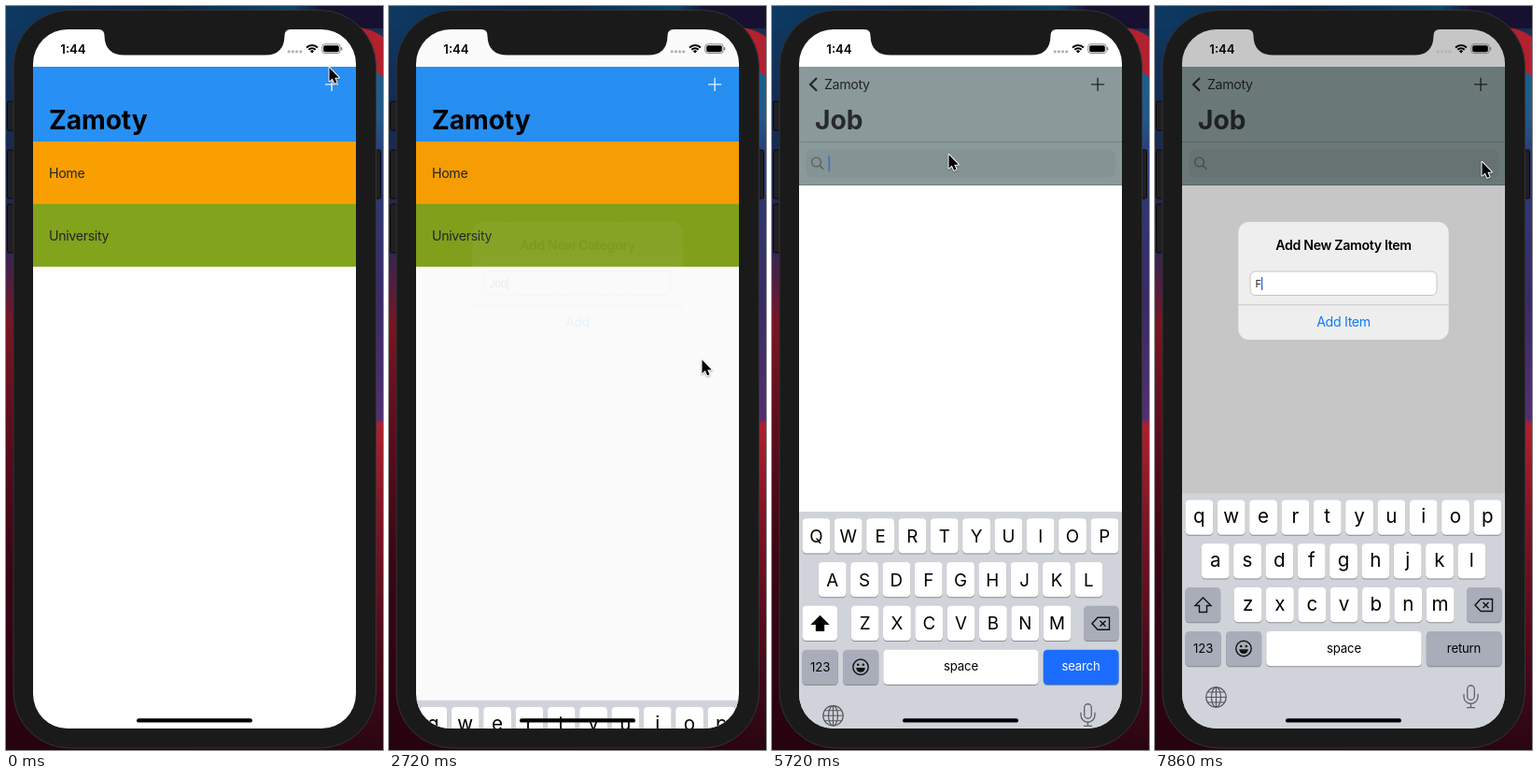
These frames come from a looping animation (404 px wide and 796 px high, 8 s). An HTML page with a canvas:

```html
<!DOCTYPE html>
<html lang="en">
<head>
<meta charset="utf-8">
<title>To-do app demo</title>
<style>
html, body { margin: 0; width: 404px; height: 796px; overflow: hidden; background: #111; }
canvas { display: block; width: 404px; height: 796px; }
</style>
</head>
<body>
<canvas id="stage"></canvas>
<script>
const W = 404, H = 796, LOOP = 8000, FPS = 7, LAST = 55;
const APP = 'Zamoty';
const L = 29, R = 375, TOP = 25, BOTTOM = 773, SCREEN_W = R - L;
const BLUE = '#2890f5', GREY = '#8a9a9a', INK = '#242529';
const canvas = document.getElementById('stage');
const ctx = canvas.getContext('2d');
const dpr = window.devicePixelRatio || 1;
canvas.width = W * dpr;
canvas.height = H * dpr;

// ---- helpers ----
const clamp = v => Math.max(0, Math.min(1, v));
const ramp = (s, start, len) => clamp((s - start) / len);
const easeOut = v => 1 - (1 - v) ** 2;

function rect(x, y, w, h, fill) {
  ctx.fillStyle = fill;
  ctx.fillRect(x, y, w, h);
}

function box(x, y, w, h, r, fill, stroke, line = 1) {
  ctx.beginPath();
  ctx.roundRect(x, y, w, h, r);
  if (fill) { ctx.fillStyle = fill; ctx.fill(); }
  if (stroke) { ctx.strokeStyle = stroke; ctx.lineWidth = line; ctx.stroke(); }
}

function text(str, x, y, size, { color = INK, weight = 400, align = 'left', track = -0.024 } = {}) {
  ctx.font = `${weight} ${size}px Inter, "Liberation Sans", sans-serif`;
  ctx.letterSpacing = size * track + 'px';
  ctx.textAlign = align;
  ctx.fillStyle = color;
  ctx.fillText(str, x, y);
}

function path(points, close) {
  ctx.beginPath();
  points.forEach(([x, y], i) => i ? ctx.lineTo(x, y) : ctx.moveTo(x, y));
  if (close) ctx.closePath();
}

function strokeLine(points, color, width, close) {
  path(points, close);
  ctx.strokeStyle = color;
  ctx.lineWidth = width;
  ctx.stroke();
}

function arc(x, y, r, a, b, color, width) {
  ctx.beginPath();
  ctx.arc(x, y, r, a, b);
  ctx.strokeStyle = color;
  ctx.lineWidth = width;
  ctx.stroke();
}

function disc(x, y, r, color) {
  ctx.beginPath();
  ctx.arc(x, y, r, 0, Math.PI * 2);
  ctx.fillStyle = color;
  ctx.fill();
}

function gradient(x0, y0, x1, y1, stops) {
  const g = ctx.createLinearGradient(x0, y0, x1, y1);
  stops.forEach(([at, color]) => g.addColorStop(at, color));
  return g;
}

function layer(alpha, draw) {
  if (alpha <= 0) return;
  ctx.save();
  ctx.globalAlpha *= alpha;
  draw();
  ctx.restore();
}

// ---- desktop and phone ----
function drawDesktop() {
  rect(0, 0, W / 2, H, gradient(0, 0, 0, H, [
    [0, '#0d3a63'], [0.12, '#122c55'], [0.24, '#1c2850'], [0.34, '#3b2350'],
    [0.43, '#7a1522'], [0.56, '#5f0d1d'], [0.75, '#3a0614'], [1, '#26030e']]));
  rect(W / 2, 0, W / 2, H, gradient(0, 0, 0, H, [
    [0, '#17112f'], [0.09, '#1b5f8a'], [0.15, '#24588a'], [0.2, '#2b3c78'],
    [0.4, '#3a2b68'], [0.555, '#52306f'], [0.562, '#b01f2e'], [0.7, '#7c1425'],
    [0.88, '#480a1a'], [1, '#2a0511']]));
  rect(0, 0, W, 24, gradient(0, 0, W, 0, [
    [0, '#0d3a63'], [0.4, '#0b2745'], [0.76, '#0d4565'], [0.84, '#17112f'], [1, '#17112f']]));
  ctx.beginPath();
  ctx.moveTo(372, 22);
  ctx.quadraticCurveTo(392, 24, W, 33);
  ctx.lineTo(W, 76);
  ctx.quadraticCurveTo(394, 66, 380, 62);
  ctx.fillStyle = '#b3202e';
  ctx.fill();
}

function drawPhone() {
  [[1.5, 102, 31], [1.5, 154, 52], [1.5, 212, 52], [394.5, 154, 52]].forEach(([x, y, h]) =>
    box(x, y, 7, h, 1.5, '#202022', '#08080a'));
  box(8, 4.5, 388.5, 789.5, 60, '#1a1a1a', '#333335');
}

function drawNotch() {
  ctx.beginPath();
  ctx.moveTo(99, 24);
  ctx.lineTo(99, 25);
  ctx.quadraticCurveTo(105.5, 25, 105.5, 32);
  ctx.quadraticCurveTo(106, 52.5, 127, 52.5);
  ctx.lineTo(278, 52.5);
  ctx.quadraticCurveTo(298, 52.5, 298.5, 32);
  ctx.quadraticCurveTo(298.5, 25, 305, 25);
  ctx.lineTo(305, 24);
  ctx.fillStyle = '#1a1a1a';
  ctx.fill();
}

function drawStatus() {
  text('1:44', 58.3, 50.6, 13.2, { weight: 600, color: '#000', track: 0 });
  for (let i = 0; i < 4; i++) disc(303.2 + i * 4.2, 48.8, 1.65, '#b4b4b8');
  for (const r of [8.4, 5.2]) arc(328, 50.5, r, -Math.PI * 0.75, -Math.PI * 0.25, '#000', 2);
  path([[325.8, 48.2], [328, 47], [330.2, 48.2], [328, 50.6]], true);
  ctx.fillStyle = '#000';
  ctx.fill();
  box(338.8, 40.8, 19.4, 9.8, 2.8, null, '#77777a', 0.9);
  box(340.2, 42.2, 16.6, 7, 1.6, '#000');
  box(359, 44, 1.3, 3.4, 0.7, '#77777a');
}

// ---- app pages ----
function drawPlus(color) {
  strokeLine([[342, 83.8], [356.2, 83.8]], color, 1.35);
  strokeLine([[349.1, 76.7], [349.1, 90.9]], color, 1.35);
}

function drawList(dx, s) {
  const rows = [['Home', '#f99f02'], ['University', '#82a31c']];
  if (s >= 20) rows.push(['Job', GREY]);
  rect(L + dx, 145, SCREEN_W, BOTTOM - 145, '#fff');
  rows.forEach(([name, color], i) => {
    const y = 145 + i * 66.9;
    rect(L + dx, y, SCREEN_W, 67, color);
    if (i === 2 && s >= 32) rect(L + dx, y, SCREEN_W, 67, 'rgba(0,0,0,.12)');
    text(name, 46 + dx, y + 38.8, 14.2);
  });
}

function drawItems(dx, caret) {
  rect(L + dx, 145, SCREEN_W, BOTTOM - 145, '#fff');
  rect(L + dx, 145, SCREEN_W, 47, GREY);
  rect(L + dx, 145, SCREEN_W, 1, '#738181');
  rect(L + dx, 191, SCREEN_W, 1, '#738181');
  box(36 + dx, 153.5, 332.5, 30, 8, '#849393');
  arc(47.5 + dx, 167, 4.9, 0, Math.PI * 2, '#596565', 1.4);
  strokeLine([[51 + dx, 170.6], [55.3 + dx, 174.8]], '#596565', 1.5);
  if (caret) rect(60.5 + dx, 160, 1.6, 17, '#3470d8');
}

function drawApp(s, push, alert) {
  const bold = { weight: 700, track: -0.002 };
  const pressed = s === 4 || s === 48 || s === 49;
  rect(L, TOP, SCREEN_W, 40, '#fff');
  if (push < 1) drawList(-104 * push, s);
  if (push > 0) drawItems(SCREEN_W * (1 - push), s >= 39 && s < 45);
  rect(L, 65, SCREEN_W, 80, BLUE);
  layer(push, () => rect(L, 65, SCREEN_W, 80, GREY));
  layer(1 - push, () => {
    text(APP, 46 - 60 * push, 131.6, 28.2, { ...bold, color: '#000' });
    layer(pressed ? 0.4 : 1, () => drawPlus(alert > 0.3 ? '#b4bac0' : '#eef6ff'));
  });
  layer(push, () => {
    text('Job', 46 + 330 * (1 - push), 131.6, 28.2, { ...bold, color: '#28292c' });
    strokeLine([[48, 77], [41, 83.9], [48, 90.8]], '#26282b', 2.2);
    text(APP, 56 + 60 * (1 - push), 88.9, 14.2);
    layer(pressed ? 0.35 : 1, () => drawPlus(INK));
  });
}

// ---- alert ----
function drawAlert(a) {
  ctx.save();
  const k = a.zoom;
  ctx.translate(202, 294);
  ctx.scale(k, k);
  ctx.translate(-202, -294);
  const fill = a.tinted
    ? gradient(0, 231, 0, 357, [[0, '#d2dcae'], [0.22, '#dce3c3'], [0.5, '#ececea'], [1, '#f0f0f0']])
    : '#eeeeee';
  box(89.3, 231, 225.4, 126, 11.5, fill);
  text(a.title, 202, 260.6, 14.2, { weight: 600, align: 'center', color: '#000' });
  box(102, 284, 200, 25.5, 5.5, '#fff', '#c3c3c6');
  text(a.typed, 107.5, 301.2, 11, { color: '#222' });
  rect(107.6 + ctx.measureText(a.typed).width, 290, 1.5, 14, '#3470d8');
  if (a.pressed) box(89.3, 320, 225.4, 37, [0, 0, 11.5, 11.5], '#dcdcdc');
  rect(89.3, 319.3, 225.4, 0.9, '#c2c2c4');
  text(a.action, 202, 343.4, 14.2, { align: 'center', color: '#0d7bff' });
  ctx.restore();
}

// ---- keyboard ----
const ROWS = [['qwertyuiop', 32.5, 528.5], ['asdfghjkl', 49.8, 575.3], ['zxcvbnm', 84.7, 622.1]];
const PITCH = 34.33, KEY_W = 29.8, KEY_H = 37.2, SPECIAL = '#a9adb9';

function key(x, y, w, fill = '#fff') {
  box(x, y + 1, w, KEY_H, 4.2, '#898b90');
  box(x, y, w, KEY_H, 4.2, fill);
}

function drawShift(filled) {
  const arrow = [[51.5, 633], [60, 641.5], [55.5, 641.5], [55.5, 648.5],
    [47.5, 648.5], [47.5, 641.5], [43, 641.5]];
  path(arrow, true);
  ctx.fillStyle = '#000';
  if (filled) ctx.fill();
  strokeLine(arrow, '#111', 1.4, true);
}

function drawBackspace() {
  strokeLine([[343, 641], [349, 634.5], [361.5, 634.5], [361.5, 647.5], [349, 647.5]], '#111', 1.4, true);
  strokeLine([[351.5, 638], [357.5, 644]], '#111', 1.4);
  strokeLine([[357.5, 638], [351.5, 644]], '#111', 1.4);
}

function drawEmoji() {
  arc(95, 687.5, 8.2, 0, Math.PI * 2, '#111', 1.4);
  disc(92.2, 685, 1.3, '#111');
  disc(97.8, 685, 1.3, '#111');
  ctx.beginPath();
  ctx.arc(95, 688.3, 4.8, 0, Math.PI);
  ctx.fill();
}

function drawGlobe() {
  const c = '#55585e';
  arc(65.5, 739.5, 10.7, 0, Math.PI * 2, c, 1.2);
  ctx.beginPath();
  ctx.ellipse(65.5, 739.5, 5, 10.7, 0, 0, Math.PI * 2);
  ctx.stroke();
  strokeLine([[65.5, 729], [65.5, 750]], c, 1.2);
  for (const [y, w] of [[734, 9.2], [739.5, 10.7], [745, 9.2]])
    strokeLine([[65.5 - w, y], [65.5 + w, y]], c, 1.2);
}

function drawMic() {
  const c = '#606369';
  box(334.7, 727, 7.6, 15.5, 3.8, null, c, 1.3);
  ctx.beginPath();
  ctx.moveTo(331, 736);
  ctx.lineTo(331, 739);
  ctx.arc(338.5, 739, 7.5, Math.PI, 0, true);
  ctx.lineTo(346, 736);
  ctx.stroke();
  strokeLine([[338.5, 746.5], [338.5, 750.5]], c, 1.3);
  strokeLine([[334, 750.7], [343, 750.7]], c, 1.3);
}

function drawKeyboard(dy, upper, search) {
  const label = { align: 'center', color: '#000', track: -0.015 };
  ctx.save();
  ctx.translate(0, dy);
  rect(L, 521.3, SCREEN_W, 260, '#d0d3d9');
  for (const [letters, x0, y] of ROWS) {
    [...letters].forEach((ch, i) => {
      const x = x0 + i * PITCH;
      key(x, y, KEY_W);
      text(upper ? ch.toUpperCase() : ch, x + KEY_W / 2, y + (upper ? 25.6 : 24.8),
        upper ? 18.8 : 20.6, { ...label, track: 0 });
    });
  }
  key(32.5, 622.1, 37.7, upper ? '#fff' : SPECIAL);
  drawShift(upper);
  key(334, 622.1, 37.5, SPECIAL);
  drawBackspace();
  key(32.5, 669, 38.3, SPECIAL);
  text('123', 51.6, 692.3, 13.2, label);
  key(76.2, 669, 38, SPECIAL);
  drawEmoji();
  key(119.3, 669, 166.3);
  text('space', 202.5, 691.6, 13.2, label);
  key(290.8, 669, 80.7, search ? '#1c6dff' : SPECIAL);
  text(search ? 'search' : 'return', 331, 691.6, 13.2, { ...label, color: search ? '#fff' : '#000' });
  drawGlobe();
  drawMic();
  ctx.restore();
}

// ---- pointer ----
const POINTER = [
  [0, 346.5, 66], [2, 346.5, 66], [3, 349, 73], [4, 350.5, 76], [11, 350.5, 76],
  [14, 330, 200], [17, 300, 340], [18, 304, 346], [19, 335.5, 378.5], [22, 338, 388],
  [23, 338, 388], [27, 262, 362], [30, 168, 317], [31, 164.5, 314.5], [35, 164.5, 314.5],
  [38, 187, 166], [39, 189.5, 159], [42, 189.5, 159], [47, 334, 80], [48, 337.5, 77.5],
  [49, 337.5, 77.5], [52, 350.5, 167], [56, 350.5, 167]];

function drawPointer(s) {
  const i = Math.max(1, POINTER.findIndex(p => p[0] >= s));
  const [t0, x0, y0] = POINTER[i - 1], [t1, x1, y1] = POINTER[i];
  const f = ramp(s, t0, t1 - t0);
  ctx.save();
  ctx.translate(x0 + (x1 - x0) * f, y0 + (y1 - y0) * f);
  path([[0, 0], [0, 14.6], [3.3, 11.5], [5.6, 16.8], [8, 15.7], [5.8, 10.7], [10.3, 10.7]], true);
  ctx.lineJoin = 'round';
  ctx.shadowColor = 'rgba(0,0,0,.35)';
  ctx.shadowBlur = 2 * dpr;
  ctx.shadowOffsetY = dpr;
  ctx.strokeStyle = '#fff';
  ctx.lineWidth = 2;
  ctx.stroke();
  ctx.shadowColor = 'transparent';
  ctx.fillStyle = '#000';
  ctx.fill();
  ctx.restore();
}

// ---- timeline, counted in steps of 1/7 s ----
function alertAt(s) {
  const first = s < 24;
  const shown = first ? ramp(s, 4.3, 1.6) : ramp(s, 48.4, 1.6);
  const alpha = shown * (first ? 1 - ramp(s, 17.5, 1.6) : 1);
  return {
    alpha, zoom: 1 + 0.12 * (1 - easeOut(shown)), tinted: first,
    title: first ? 'Add New Category' : `Add New ${APP} Item`,
    action: first ? 'Add' : 'Add Item',
    typed: first ? 'Job'.slice(0, s < 7 ? 0 : s < 10 ? 1 : s < 11 ? 2 : 3) : s >= 53 ? 'F' : '',
    pressed: s === 17
  };
}

function keyboardAt(s) {
  const rise = (start, len) => easeOut(ramp(s, start, len));
  if (s < 24) return { up: rise(4.3, 2.3) - rise(17.5, 2.3), upper: s < 8 };
  if (s < 48) return { up: rise(38.2, 2.5) - rise(43.6, 2.3), upper: true, search: true };
  return { up: rise(48.4, 2.3), upper: s < 55 };
}

function draw(s) {
  const alert = alertAt(s), kb = keyboardAt(s);
  const push = easeOut(ramp(s, 32, 3.6));
  ctx.setTransform(dpr, 0, 0, dpr, 0, 0);
  drawDesktop();
  drawPhone();

  ctx.save();
  ctx.beginPath();
  ctx.roundRect(L, TOP, SCREEN_W, BOTTOM - TOP, 37);
  ctx.clip();
  drawApp(s, push, alert.alpha);
  rect(L, TOP, SCREEN_W, BOTTOM - TOP, `rgba(0,0,0,${0.225 * alert.alpha})`);
  layer(alert.alpha, () => drawAlert(alert));
  if (kb.up > 0) drawKeyboard(252 * (1 - kb.up), kb.upper, kb.search);
  drawStatus();
  box(140, 762.2, 124, 4.4, 2.2, '#000');
  ctx.restore();

  drawNotch();
  drawPointer(s);
}

function tick() {
  const t = performance.now() % LOOP;
  draw(Math.min(LAST, Math.floor((t + 5) * FPS / 1000)));
  requestAnimationFrame(tick);
}
tick();
</script>
</body>
</html>
```
